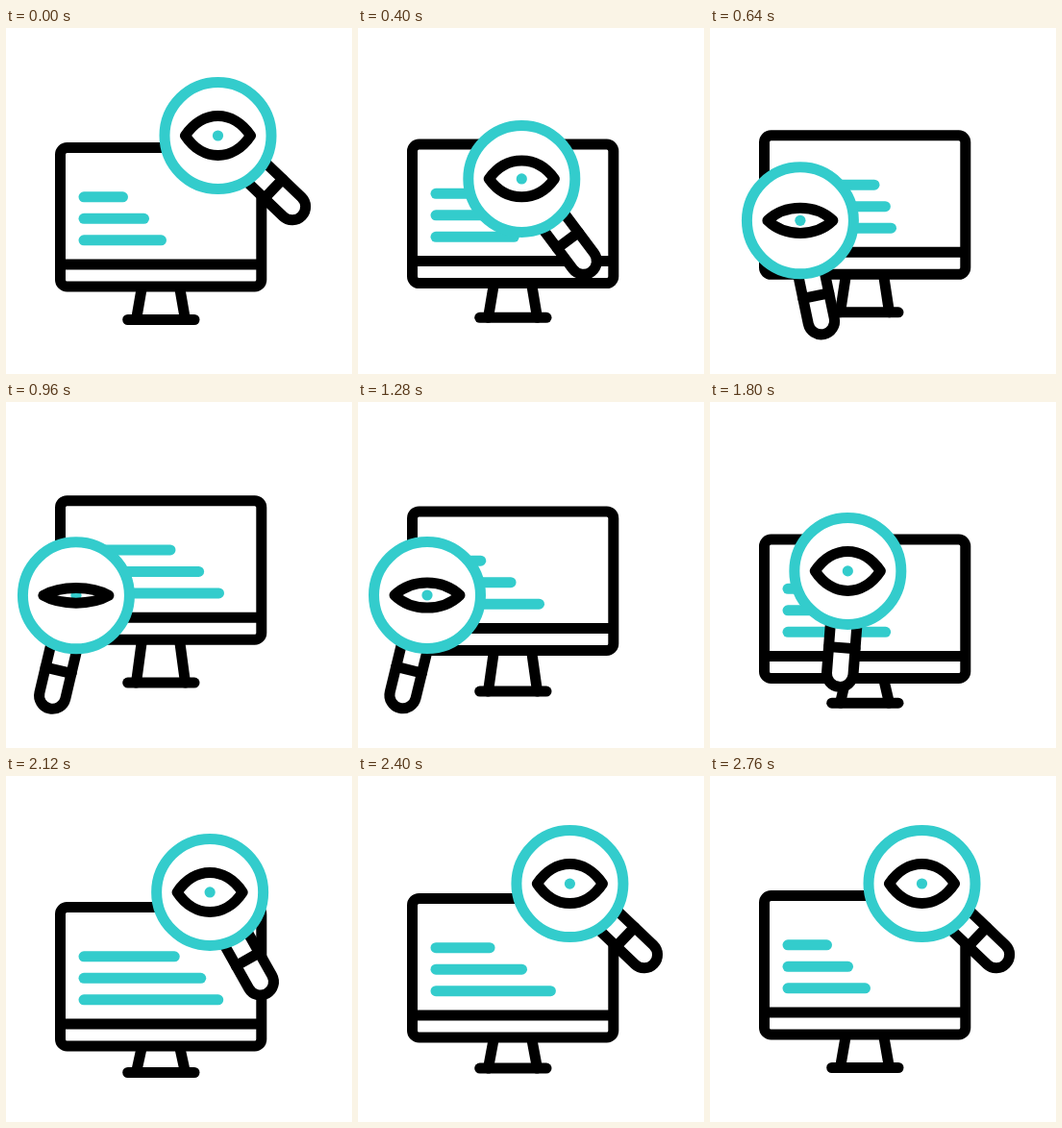
An HTML page with a canvas that plays this animation: 360 by 360 pixels, repeating every 3000 ms.

```html
<!DOCTYPE html>
<html lang="en">
<head>
<meta charset="utf-8">
<title>Screen inspection</title>
<style>
  html, body { margin: 0; width: 100%; height: 100%; overflow: hidden; background: #fff; }
  canvas { display: block; width: 360px; height: 360px; }
</style>
</head>
<body>
<canvas id="stage"></canvas>
<script>
const LOOP = 3000, STEP = 40;
const BLACK = '#000', TEAL = '#33cccc', WHITE = '#fff';
const canvas = document.getElementById('stage');
const ctx = canvas.getContext('2d');
const scale = window.devicePixelRatio || 1;
canvas.width = canvas.height = 360 * scale;

const clamp = v => Math.min(1, Math.max(0, v));
const smooth = v => { v = clamp(v); return v * v * (3 - 2 * v); };

// Value at time t on [time, value] keys, eased between neighbours.
function track(t, keys) {
  let value = keys[0][1];
  for (let i = 1; i < keys.length; i++) {
    const [t0, v0] = keys[i - 1], [t1, v1] = keys[i];
    value += (v1 - v0) * smooth((t - t0) / (t1 - t0));
  }
  return value;
}

function cubic(s, a, b, c, d) {
  const r = 1 - s;
  return r * r * r * a + 3 * r * r * s * b + 3 * r * s * s * c + s * s * s * d;
}

// Quick start with a long settle: cubic-bezier(.25, 0, .17, 1).
function settle(v) {
  v = clamp(v);
  let lo = 0, hi = 1;
  for (let i = 0; i < 24; i++) {
    const u = (lo + hi) / 2;
    if (cubic(u, 0, 0.25, 0.17, 1) < v) lo = u; else hi = u;
  }
  return smooth((lo + hi) / 2);
}

function stroke(color) {
  ctx.strokeStyle = color;
  ctx.stroke();
}

function line(x0, y0, x1, y1, color = BLACK) {
  ctx.beginPath();
  ctx.moveTo(x0, y0);
  ctx.lineTo(x1, y1);
  stroke(color);
}

function drawMonitor(t) {
  const lift = track(t, [[200, 0], [1000, -22], [1800, 18.5], [2600, 0]]);
  const base = 303.5 + track(t, [[200, 0], [920, -11.6], [1720, 10], [2520, 0]]);
  const bottom = 269 + lift;

  line(141.5, bottom, 135.5, base);
  line(180.5, bottom, 186.5, base);
  line(126.7, base, 196, base);

  ctx.beginPath();
  ctx.roundRect(56.5, 124.5 + lift, 209.3, 144.5, 7);
  ctx.fillStyle = WHITE;
  ctx.fill();
  stroke(BLACK);
  line(60, 246 + lift, 262, 246 + lift);

  [121.5, 143.5, 161.5].forEach((shortEnd, i) => {
    const start = 200 + i * 80;
    const grow = track(t, [0, 1, 0, 1, 0].map((v, k) => [start + k * 600, v * 60]));
    const y = 175.8 + i * 22.5 + lift;
    line(81, y, shortEnd + grow, y, TEAL);
  });
}

function drawHandle(angle) {
  const half = 13.8, end = 107;
  ctx.save();
  ctx.rotate(-angle * Math.PI / 180);
  ctx.beginPath();
  ctx.moveTo(-half, 55);
  ctx.lineTo(-half, end);
  ctx.arc(0, end, half, Math.PI, 0, true);
  ctx.lineTo(half, 55);
  ctx.fillStyle = WHITE;
  ctx.fill();
  stroke(BLACK);
  line(-half, 80, half, 80);
  ctx.restore();
}

function drawEye(open) {
  ctx.beginPath();
  ctx.arc(0, 0, 5.6, 0, Math.PI * 2);
  ctx.fillStyle = TEAL;
  ctx.fill();

  const bend = open * 4 / 3;
  ctx.beginPath();
  ctx.moveTo(-34, 0);
  ctx.bezierCurveTo(-16, -bend, 16, -bend, 34, 0);
  ctx.bezierCurveTo(16, bend, -16, bend, -34, 0);
  ctx.closePath();
  stroke(BLACK);
}

function drawMagnifier(t) {
  const s = settle((t - 200) / 880) - settle((t - 1560) / 880);
  const angle = track(t, [[200, 46.3], [1000, -13.7], [1600, -13.7], [2400, 46.3]]);
  const open = track(t, [[240, 20.5], [960, 7.8], [1680, 20.5]]);

  ctx.save();
  ctx.translate(cubic(s, 220.5, 192, 103, 72), cubic(s, 112, 145, 213, 201));
  drawHandle(angle);
  ctx.beginPath();
  ctx.arc(0, 0, 55.5, 0, Math.PI * 2);
  ctx.fillStyle = WHITE;
  ctx.fill();
  stroke(TEAL);
  drawEye(open);
  ctx.restore();
}

function frame(now) {
  const t = Math.floor((now % LOOP) / STEP) * STEP;
  ctx.setTransform(scale, 0, 0, scale, 0, 0);
  ctx.fillStyle = WHITE;
  ctx.fillRect(0, 0, 360, 360);
  ctx.lineWidth = 11;
  ctx.lineCap = ctx.lineJoin = 'round';
  drawMonitor(t);
  drawMagnifier(t);
}

const begin = performance.now();
function tick() {
  frame(performance.now() - begin);
  requestAnimationFrame(tick);
}
tick();
</script>
</body>
</html>
```
